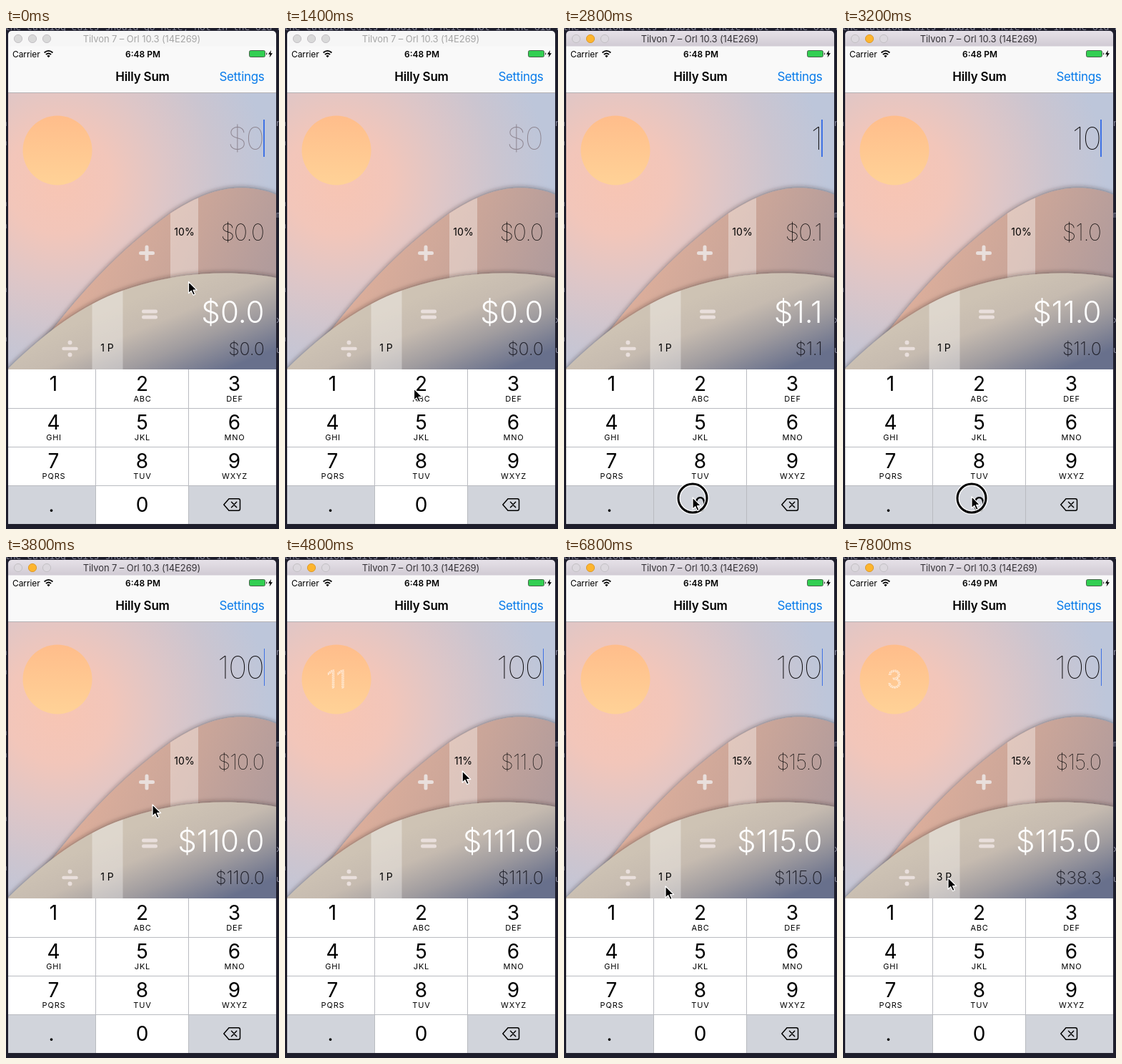
Animation, 382 px wide and 700 px high, one loop 8000 ms. Source, as an HTML page:

```html
<!DOCTYPE html>
<html lang="en">
<head>
<meta charset="utf-8">
<title>Tip calculator</title>
<style>
  html, body { margin: 0; width: 100%; height: 100%; overflow: hidden; background: #1e1e2c; }
  svg { display: block; width: 100%; height: 100%; font-family: Inter, Roboto, sans-serif; }
  .mid { text-anchor: middle; }
  .end { text-anchor: end; }
  .thin { font-weight: 100; letter-spacing: -.03em; }
  .desk { font: 13px "Noto Sans Mono", monospace; fill: #85869a; }
</style>
</head>
<body>
<svg viewBox="0 0 382 700" xmlns="http://www.w3.org/2000/svg">
  <defs>
    <linearGradient id="barOn" x2="0" y2="1"><stop stop-color="#e6e1e8"/><stop offset="1" stop-color="#d0cad3"/></linearGradient>
    <radialGradient id="sky" gradientUnits="userSpaceOnUse" cx="74" cy="214" r="295">
      <stop stop-color="#f8c5b3"/><stop offset=".25" stop-color="#f2c6ba"/>
      <stop offset=".5" stop-color="#dec6c7"/><stop offset=".75" stop-color="#cbc5d0"/><stop offset="1" stop-color="#bdc6da"/>
    </radialGradient>
    <linearGradient id="sunFill" x2="0" y2="1"><stop stop-color="#ffbd8b"/><stop offset="1" stop-color="#ffd297"/></linearGradient>
    <linearGradient id="farFill" gradientUnits="userSpaceOnUse" x1="150" y1="250" x2="370" y2="350">
      <stop stop-color="#dcae9b"/><stop offset=".5" stop-color="#c9a599"/><stop offset="1" stop-color="#b09b9c"/>
    </linearGradient>
    <linearGradient id="nearFill" gradientUnits="userSpaceOnUse" x1="200" y1="370" x2="253" y2="500">
      <stop stop-color="#cec3b4"/><stop offset=".3" stop-color="#c6bbb0"/>
      <stop offset=".62" stop-color="#a09c9f"/><stop offset="1" stop-color="#68708c"/>
    </linearGradient>
    <filter id="shade" x="-10%" y="-10%" width="120%" height="120%">
      <feDropShadow dx="0" dy="-1" stdDeviation="3" flood-color="#2a2020" flood-opacity=".5"/>
    </filter>
    <path id="far" d="M40 455C100 372 160 310 230 259C268 234 300 223.5 328 223.5C346 223.5 362 226 378 233L400 244V490H20Z"/>
    <path id="near" d="M-8 486L3 476C55 425 108 386 163 367C215 349 262 342.5 306 342.5C332 342.5 358 345 378 349L400 354V500H-8Z"/>
    <clipPath id="inScene"><path d="M3 91H378V477H3Z"/></clipPath>
    <clipPath id="inFar"><use href="#far"/></clipPath>
    <clipPath id="inNear"><use href="#near"/></clipPath>
  </defs>

  <rect width="382" height="700" fill="#1e1e2c"/>
  <g class="desk" id="desk"><text x="-2" y="3">the catalog edits should go here, not in the old map</text></g>

  <path id="bar" d="M3 26V9a5 5 0 0 1 5-5H373a5 5 0 0 1 5 5V26Z"/>
  <g id="lights"></g>
  <text id="device" class="mid" x="190" y="20" font-size="13" letter-spacing="-.1">Tilvon 7 – Orl 10.3 (14E269)</text>

  <path d="M3 25.5H378V693H3Z" fill="#f9f9f9"/>
  <text x="9" y="41" font-size="12" letter-spacing="-.1">Carrier</text>
  <g fill="none" stroke="#000" stroke-width="1.8">
    <path d="M53.6 34.5Q59.5 29.2 65.4 34.5M55.9 37.1Q59.5 33.9 63.1 37.1"/>
    <path d="M59.5 41.3L57.3 38.9Q59.5 37.2 61.7 38.9Z" fill="#000" stroke="none"/>
  </g>
  <text id="clock" class="mid" x="191.5" y="41" font-size="12" font-weight="600"></text>
  <rect x="340.5" y="31.5" width="22" height="9" rx="2" fill="#32cf52" stroke="#47604a"/>
  <path d="M364 34.3v3.5q1.4-.5 1.4-1.75t-1.4-1.75Z" fill="#333"/>
  <path d="M371 31L367 36.8H369.5L368.6 41.2L373 35.2H370.3Z"/>
  <text class="mid" x="191" y="74" font-size="17" font-weight="600" letter-spacing="-.2">Hilly Sum</text>
  <text class="end" x="361.5" y="74" font-size="17" letter-spacing="-.3" fill="#087bea">Settings</text>
  <path d="M3 90.5H378" stroke="#b4b2b4"/>

  <g clip-path="url(#inScene)">
    <rect x="3" y="91" width="375" height="386" fill="url(#sky)"/>
    <circle cx="72" cy="171" r="48.5" fill="url(#sunFill)"/>
    <text id="sunText" class="mid" x="72" y="183" font-size="34" font-weight="300" fill="#fff" fill-opacity=".28"
      stroke="#fff" stroke-opacity=".7" stroke-dasharray="2 1"></text>
    <use href="#far" fill="url(#farFill)" filter="url(#shade)"/>
    <rect x="230" y="220" width="39" height="150" fill="#fff" opacity=".35" clip-path="url(#inFar)"/>
    <use href="#near" fill="url(#nearFill)" filter="url(#shade)"/>
    <rect x="120.5" y="360" width="43" height="120" fill="#fff" opacity=".33" clip-path="url(#inNear)"/>
    <g stroke="#e9dfdc" stroke-width="5" stroke-linecap="round">
      <path d="M188.5 314.5H205.5M197 306V323"/>
      <path d="M192.5 396H209.5M192.5 404H209.5"/>
      <path d="M80.5 448H98.5" stroke-width="4.5"/>
      <path d="M89.5 439.5h.01M89.5 456.5h.01" stroke-width="6"/>
    </g>
    <text id="rate" class="mid" x="249.5" y="290" font-size="14"></text>
    <text id="people" class="mid" x="141.5" y="452" font-size="14"></text>
    <text id="bill" class="end thin" x="360.5" y="170" font-size="44"></text>
    <text id="tip" class="end thin" x="361" y="296.5"></text>
    <text id="total" class="end" x="361.5" y="412" font-size="42" font-weight="300" fill="#fff"></text>
    <text id="share" class="end" x="361.5" y="457" font-size="25" font-weight="200" letter-spacing="-.3" fill="#20202a"></text>
    <rect id="caret" x="360" y="128" height="52" fill="#3f72e4"/>
  </g>

  <g id="pad"></g>
  <g fill="none" stroke="#000" stroke-width="1.5" stroke-linejoin="round" stroke-linecap="round">
    <path d="M312 657.8H325Q327.5 657.8 327.5 660.3V671.7Q327.5 674.2 325 674.2H312L304.8 666Z"/>
    <path d="M315.5 662.3L322.7 669.7M322.7 662.3L315.5 669.7"/>
  </g>

  <g id="ring" fill="none">
    <circle cx="180" cy="657" r="20" stroke="#fff" stroke-opacity=".8" stroke-width="6"/>
    <circle cx="180" cy="657" r="20" stroke="#000" stroke-width="3"/>
  </g>
  <path id="mouse" d="M0 0V16.2L3.7 12.7L6.5 18.6L9.2 17.4L6.5 11.7H11.6Z"
    stroke="#fff" stroke-width="1.2" stroke-linejoin="round"/>
</svg>

<script>
const LOOP = 8000, STEP = 200;
const $ = id => document.getElementById(id);
const NS = 'http://www.w3.org/2000/svg';

function add(parent, tag, attrs, text = '') {
  const el = document.createElementNS(NS, tag);
  for (const key in attrs) el.setAttribute(key, attrs[key]);
  el.textContent = text;
  return parent.appendChild(el);
}
const set = (id, text) => { $(id).textContent = text; };
const attr = (id, name, value) => $(id).setAttribute(name, value);
const show = (id, on) => attr(id, 'visibility', on ? 'visible' : 'hidden');

// Letters of the window behind, peeking out at the sides
[['n', 133], ['m', 261], ['x', 408], ['u', 450]].forEach(([c, y]) => add($('desk'), 'text', { x: 378, y: y + 4 }, c));
[133, 160, 245, 276, 365, 434].forEach(y => add($('desk'), 'text', { x: -6, y: y + 4 }, 'a'));

const lights = [17, 37, 57].map(cx => add($('lights'), 'circle', { cx, cy: 15, r: 5.6 }));

const GREY = '#d1d4db', ROW = 54;
const colX = [3, 126, 256, 378], mid = [66.5, 190.5, 319.5];
const letters = ['', 'ABC', 'DEF', 'GHI', 'JKL', 'MNO', 'PQRS', 'TUV', 'WXYZ'];
const keys = {};
['1', '2', '3', '4', '5', '6', '7', '8', '9', '.', '0', ''].forEach((label, i) => {
  const c = i % 3, top = 477 + Math.floor(i / 3) * ROW, last = i > 8;
  keys[label] = add($('pad'), 'rect', {
    x: colX[c], y: top, width: colX[c + 1] - colX[c], height: ROW, fill: '#fff'
  });
  const x = label === '.' ? 63.5 : mid[c];
  add($('pad'), 'text', { class: 'mid', x, y: top + (last ? 36.8 : 30.4), 'font-size': 28 }, label);
  add($('pad'), 'text', { class: 'mid', x: mid[c] + .5, y: top + 45.2, 'font-size': 11, 'letter-spacing': .8 }, letters[i]);
});
add($('pad'), 'path', {
  d: 'M3 531.5H378M3 585.5H378M3 639.5H378M125.5 477V693M255.5 477V693', stroke: '#b9bbc0', fill: 'none'
});

// time, x, y of the pointer tip
const route = [
  [0, 255.5, 354.5], [600, 255, 358], [1200, 215, 450], [1400, 180.5, 504], [1800, 84, 505],
  [2200, 84, 505], [2600, 172, 645], [2800, 180, 656], [3400, 180, 654], [3600, 195, 510],
  [3800, 205, 346], [4400, 249, 302], [4600, 249, 302], [5800, 244, 284], [6200, 244, 284],
  [6800, 142, 460], [7000, 142, 460], [7600, 147, 448], [8000, 147, 448]
];
function pointer(t) {
  const i = route.findIndex(p => p[0] > t);
  const [a, b] = [route[i - 1], route[i]];
  const k = (t - a[0]) / (b[0] - a[0]);
  return [a[1] + (b[1] - a[1]) * k, a[2] + (b[2] - a[2]) * k];
}

function caretLevel(t) {
  const p = t % 1000;
  if (t < 2200) return p < 400 || p >= 800 ? 2 : 0;
  if (t < 3400) return 2;
  return p < 400 ? 0 : p < 800 ? 2 : 1;
}

const money = v => '$' + v.toFixed(1);

function draw(t) {
  const active = t >= 1600;
  attr('bar', 'fill', active ? 'url(#barOn)' : '#f6f6f6');
  attr('device', 'fill', active ? '#363338' : '#a6a6a6');
  lights.forEach((dot, i) => {
    const amber = active && i === 1;
    dot.setAttribute('fill', amber ? '#fdb52e' : active ? '#dcd8de' : '#d9d9d9');
    dot.setAttribute('stroke', amber ? '#dd9a2c' : '#c3c0c4');
  });
  set('clock', t < 7400 ? '6:48 PM' : '6:49 PM');

  const typed = t < 2200 ? '' : t < 3000 ? '1' : t < 3400 ? '10' : '100';
  const rate = 10 + Math.max(0, Math.min(5, Math.floor((t - 4600) / 200)));
  const people = t < 7200 ? 1 : t < 7600 ? 2 : 3;
  const tip = typed * rate / 100, total = +typed + tip;

  set('bill', typed || '$0');
  attr('bill', 'fill', typed ? '#0c0a0c' : '#8d8590');
  set('rate', rate + '%');
  set('people', people + ' P');
  set('tip', money(tip));
  attr('tip', 'font-size', tip < 10 ? 32 : 29);
  set('total', money(total));
  set('share', money(total / people));
  set('sunText', t < 6800 ? rate : people);
  show('sunText', t >= 4800 && t < 6400 || t >= 7200);

  const level = caretLevel(t);
  attr('caret', 'width', level);
  attr('caret', 'x', level === 1 ? 361 : 360);

  const down = t >= 1800 && t < 2200 ? '1' : t >= 2800 && t < 3000 || t >= 3200 && t < 3400 ? '0' : null;
  for (const label in keys) {
    keys[label].setAttribute('fill', label === down || label === '.' || label === '' ? GREY : '#fff');
  }
  show('ring', down === '0');
  attr('mouse', 'transform', `translate(${pointer(t)})`);
}

function tick(now) {
  draw(Math.floor(now % LOOP / STEP) * STEP);
  requestAnimationFrame(tick);
}
draw(0);
requestAnimationFrame(tick);
</script>
</body>
</html>
```
